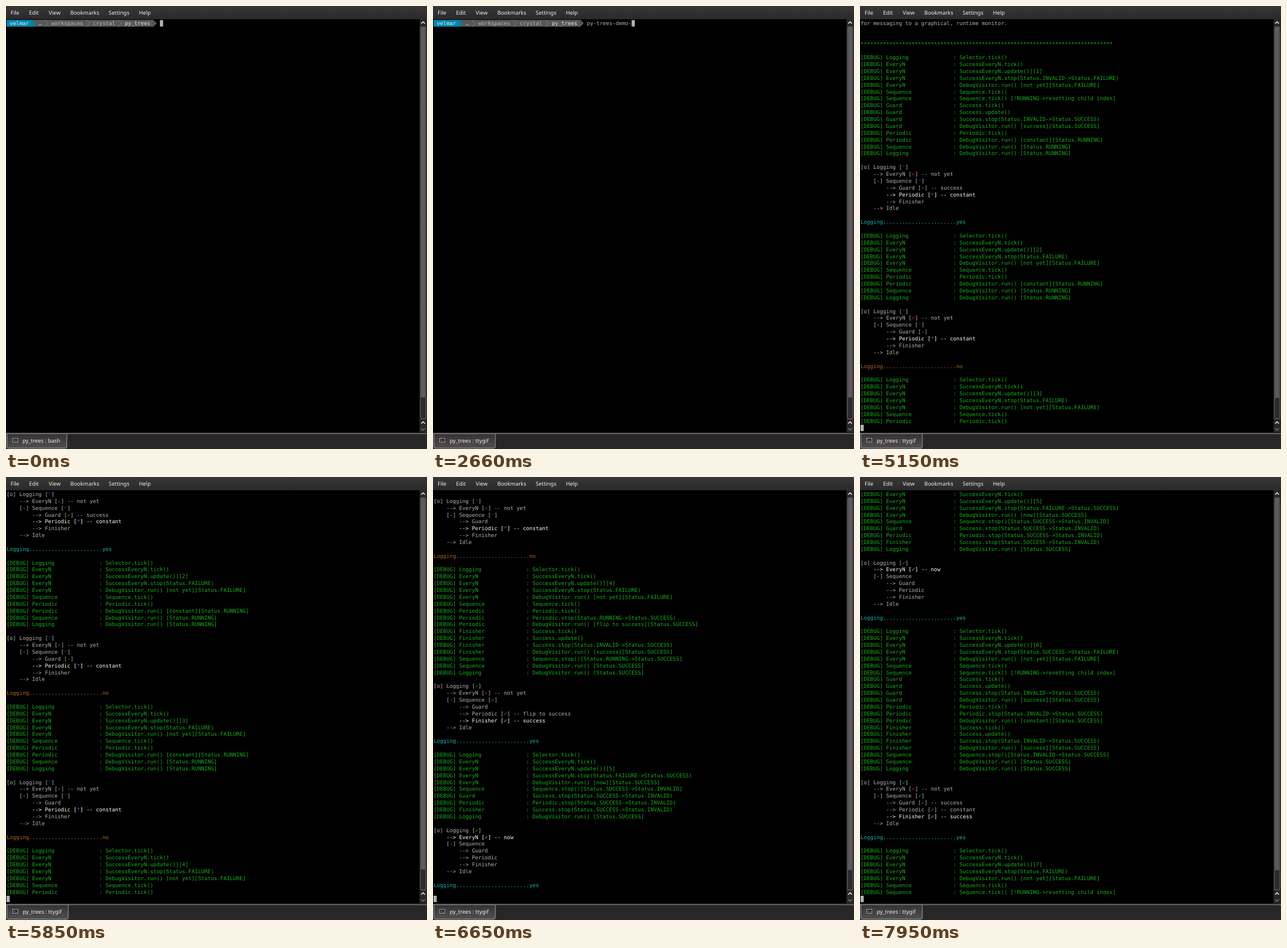
Recreate the animation shown at these times as an HTML page. Size 730 by 767 pixels, loop 8 s.

```html
<!DOCTYPE html>
<html lang="en">
<head>
<meta charset="utf-8">
<title>Terminal session</title>
<style>
html, body { margin: 0; width: 100%; height: 100%; overflow: hidden; background: #000; }
svg { display: block; }
text { white-space: pre; text-rendering: geometricPrecision; }
.mono { font: 9.2px "DejaVu Sans Mono", monospace; fill: #b2b2b2; }
.ui { font: 9.45px "Noto Sans", sans-serif; fill: #f0efee; }
</style>
</head>
<body>
<svg id="stage" width="730" height="767" viewBox="0 0 730 767">
  <defs>
    <linearGradient id="menuFill" x2="0" y2="1">
      <stop stop-color="#393736"/><stop offset="1" stop-color="#2b2929"/>
    </linearGradient>
    <linearGradient id="tabFill" x2="0" y2="1">
      <stop stop-color="#343233"/><stop offset="1" stop-color="#514f50"/>
    </linearGradient>
    <linearGradient id="groove" x2="1" y2="0">
      <stop stop-color="#4a4848"/><stop offset=".3" stop-color="#5d5b5b"/>
      <stop offset=".7" stop-color="#5d5b5b"/><stop offset="1" stop-color="#4a4848"/>
    </linearGradient>
    <clipPath id="screen"><rect y="23.5" width="717" height="714.5"/></clipPath>
  </defs>
  <rect width="730" height="767"/>
  <g clip-path="url(#screen)">
    <g id="rows" class="mono"></g>
    <rect id="cursor" width="5.5" height="11" fill="#b2b2b2"/>
  </g>
  <rect width="730" height="23" fill="url(#menuFill)"/>
  <g id="menu" class="ui"></g>

  <rect x="717" y="23" width="13" height="715" fill="#2a2828"/>
  <rect x="718" y="35.5" width="10.5" height="680" rx="3" fill="url(#groove)"/>
  <rect id="thumb" x="718.5" width="9.5" rx="2.5" fill="#2d2b2b" stroke="#6c6464" stroke-width=".8"/>
  <g fill="none" stroke="#f4f4f4" stroke-width="1.5">
    <path d="M720 30.5l3.2-3.2 3.2 3.2M720 723l3.2-3.2 3.2 3.2"/>
    <path d="M720 731.3l3.2 3.2 3.2-3.2" stroke="#8c8a8a" stroke-width="1.2"/>
  </g>

  <rect y="738" width="730" height="29" fill="#282627"/>
  <path d="M0 740.5H730" stroke="#8e8c8c"/>
  <path id="tab" fill="url(#tabFill)" stroke="#a09e9e"/>
  <rect x="11.5" y="748.5" width="9" height="7" fill="#2b2a2a" stroke="#aaa8a8" stroke-width=".9"/>
  <path d="M13.5 750.2l1.8 1.8-1.8 1.8M16.2 753.8h2.4" fill="none" stroke="#aaa8a8" stroke-width=".8"/>
  <text id="tabText" class="ui" y="755.6"></text>
</svg>
<script>
const LOOP = 8000, COL = 5.539, ROW = 11.873, LEFT = 1, TOP = 24, LAST = 59;
const GREEN = '#18b218', CYAN = '#18b2b2', BROWN = '#b26818', GREY = '#b2b2b2', WHITE = '#ffffff';
const $ = id => document.getElementById(id);
const colX = c => LEFT + c * COL;

function add(parent, tag, attrs, text) {
  const el = document.createElementNS('http://www.w3.org/2000/svg', tag);
  for (const k in attrs) el.setAttribute(k, attrs[k]);
  if (text !== undefined) el.textContent = text;
  return parent.appendChild(el);
}

[['File', 8], ['Edit', 40], ['View', 74], ['Bookmarks', 111.5], ['Settings', 178], ['Help', 230.5]]
  .forEach(([name, x]) => add($('menu'), 'text', { x, y: 15.3 }, name));

// Each row is a group; a run is [text, colour].
const rows = [];
function newRow() {
  const g = add($('rows'), 'g', { transform: `translate(0 ${rows.length * ROW})` });
  rows.push(g);
  return g;
}
function line(...runs) {
  const g = newRow();
  let col = 0;
  for (const [text, fill] of runs) {
    if (text) add(g, 'text', { x: colX(col), y: TOP + 8.9, fill }, text);
    col += text.length;
  }
}
const blank = () => line();

// Prompt
const prompt = newRow();
function block(from, to, fill) {
  add(prompt, 'rect', { x: colX(from), y: TOP, width: (to - from) * COL, height: 11.8, fill });
}
function arrow(col, fill, stroke) {
  const x = colX(col);
  add(prompt, 'path', { d: `M${x} ${TOP}l${COL} 5.9 ${-COL} 5.9`, fill, stroke, 'stroke-width': .8 });
}
block(0, 8, '#0087af');
block(8, 46, '#585858');
arrow(8, '#0087af', 'none');
[12, 25, 35].forEach(c => arrow(c, 'none', '#8c8c8c'));
arrow(46, '#585858', 'none');
[['velmar', 1, '#f4f4f4'], ['…', 10, '#c4c4c4'], ['workspaces', 14, '#bcbcbc'],
 ['crystal', 27, '#bcbcbc'], ['py_trees', 37, '#e4e4e4']]
  .forEach(([s, c, fill]) => add(prompt, 'text', { x: colX(c), y: TOP + 8.9, fill }, s));
const typed = add(prompt, 'text', { x: colX(48), y: TOP + 8.9 });

// Introduction
const stars = () => line(['*'.repeat(79), GREEN]);
blank();
stars();
line([' '.repeat(36), GREY], ['Logging', WHITE]);
stars();
`
A demonstration of logging with trees.

This demo utilises a WindsOfChange visitor to trigger
a post-tick handler to dump a serialisation of the
tree to a json log file.

This coupling of visitor and post-tick handler can be
used for any kind of event handling - the visitor is the
trigger and the post-tick handler the action. Aside from
logging, the most common use case is to serialise the tree
for messaging to a graphical, runtime monitor.

`.split('\n').forEach(s => line([s, GREY]));
stars();
blank();

// Debug entries: node letter, action letter, then optional statuses and note.
const NODES = {
  L: ['Logging', 'Selector'], E: ['EveryN', 'SuccessEveryN'], S: ['Sequence', 'Sequence'],
  G: ['Guard', 'Success'], P: ['Periodic', 'Periodic'], F: ['Finisher', 'Success']
};
const STATUS = { I: 'INVALID', F: 'FAILURE', S: 'SUCCESS', R: 'RUNNING' };

function debug(entry, n) {
  const [head, codes = '', note] = entry.split(':');
  const [name, type] = NODES[head[0]];
  const states = [...codes].map(c => 'Status.' + STATUS[c]).join('->');
  const text = {
    t: () => type + '.tick()',
    r: () => type + '.tick() [!RUNNING->resetting child index]',
    u: () => type + '.update()' + (head[0] === 'E' ? `][${n}]` : ''),
    s: () => type + (head[0] === 'S' ? `.stop()[${states}]` : `.stop(${states})`),
    d: () => 'DebugVisitor.run() ' + (note ? `[${note}]` : '') + `[${states}]`
  }[head[1]]();
  line([`[DEBUG] ${name}`.padEnd(29) + ': ' + text, GREEN]);
}

// Tree nodes: optional "!" for highlight, a mark, then a note.
const MARKS = {
  '*': ['*', '#1818b2', '#5454ff'], x: ['✕', '#b21818', '#ff5454'],
  v: ['✓', GREEN, '#54ff54'], '-': ['-', BROWN, '#ffff54']
};
const LABELS = ['[o] Logging', '    --> EveryN', '    [-] Sequence', '        --> Guard',
  '        --> Periodic', '        --> Finisher', '    --> Idle'];

function tree(nodes) {
  LABELS.forEach((label, i) => {
    let node = nodes[i] || '';
    const bold = node[0] === '!';
    if (bold) node = node.slice(1);
    const fill = bold ? WHITE : GREY;
    if (!node) return line([label, fill]);
    const [glyph, dim, bright] = MARKS[node[0]], note = node.slice(1);
    line([label + ' [', fill], [glyph, bold ? bright : dim], [']' + (note ? ' -- ' + note : ''), fill]);
  });
}

const START = 'Lt|Et|Eu|';
const FAIL = 'Es:F|Ed:F:not yet|';
const WAIT = START + FAIL + 'St|Pt|Pd:R:constant|Sd:R|Ld:R';
const GUARD = 'St|Sr|Gt|Gu|Gs:IS|Gd:S:success|';
const FINISH = 'Ft|Fu|Fs:IS|Fd:S:success|';
const TICKS = [
  { at: 3850, steps: 3, log: START + 'Es:IF|Ed:F:not yet|' + GUARD + 'Pt|Pd:R:constant|Sd:R|Ld:R',
    nodes: ['*', 'xnot yet', '*', 'vsuccess', '!*constant'], saved: true },
  { at: 4550, steps: 2, log: WAIT, nodes: ['*', 'xnot yet', '*', '-', '!*constant'] },
  { at: 5150, steps: 3, log: WAIT, nodes: ['*', 'xnot yet', '*', '', '!*constant'] },
  { at: 5850, steps: 3,
    log: START + FAIL + 'St|Pt|Ps:RS|Pd:S:flip to success|' + FINISH + 'Ss:RS|Sd:S|Ld:S',
    nodes: ['v', 'xnot yet', 'v', '', 'vflip to success', '!vsuccess'], saved: true },
  { at: 6550, steps: 2, log: START + 'Es:FS|Ed:S:now|Ss:SI|Gs:SI|Ps:SI|Fs:SI|Ld:S',
    nodes: ['v', '!vnow'], saved: true },
  { at: 7150, steps: 4,
    log: START + 'Es:SF|Ed:F:not yet|' + GUARD + 'Pt|Ps:IS|Pd:S:constant|' + FINISH + 'Ss:IS|Sd:S|Ld:S',
    nodes: ['v', 'xnot yet', 'v', 'vsuccess', 'vconstant', '!vsuccess'], saved: true },
  { at: 7950, steps: 2, log: START + FAIL + 'St|Sr', nodes: ['*'] }
];

// Output arrives in bursts of seven log lines, 100 ms apart: [time, cursor row].
const bursts = [[0, 0], [3560, 1], [3750, rows.length]];
TICKS.forEach((tick, i) => {
  const first = rows.length, log = tick.log.split('|');
  log.forEach(e => debug(e, i + 1));
  blank();
  tree(tick.nodes);
  blank();
  line(['Logging' + '.'.repeat(23) + (tick.saved ? 'yes' : 'no'), tick.saved ? CYAN : BROWN]);
  blank();
  for (let k = 1; k <= tick.steps; k++) {
    const end = k < tick.steps ? first + Math.min(7 * k, log.length) : rows.length;
    bursts.push([tick.at + 100 * (k - 1), end]);
  }
});

const COMMAND = 'py-trees-demo-logging';
const KEYS = [860, 950, 1170, 1250, 1430, 1460, 1630, 1830, 2010, 2130, 2280, 2340, 2410,
  2660, 2850, 3040, 3140, 3280, 3350, 3420, 3490];

function setTab(running) {
  const right = running ? 108 : 105.5;
  $('tab').setAttribute('d', `M1.5 740.5H${right}V763q0 2.5 -2.5 2.5H4q-2.5 0 -2.5 -2.5Z`);
  $('tabText').setAttribute('x', running ? 29 : 28.4);
  $('tabText').textContent = 'py_trees : ' + (running ? 'ttygif' : 'bash');
}

function draw(t) {
  const keys = KEYS.filter(k => t >= k).length;
  const end = bursts.filter(b => t >= b[0]).pop()[1];
  const top = Math.max(0, end - LAST);
  typed.textContent = COMMAND.slice(0, keys);
  rows.forEach((g, i) => {
    const shown = i >= top && (i < end || i === 0);
    g.setAttribute('display', shown ? 'inline' : 'none');
  });
  $('rows').setAttribute('transform', `translate(0 ${-top * ROW})`);
  $('cursor').setAttribute('x', colX(end ? 0 : 48 + keys));
  $('cursor').setAttribute('y', TOP + .5 + (end - top) * ROW);
  const thumbY = 677 + [5150, 5850, 6050].filter(s => t >= s).length;
  $('thumb').setAttribute('y', thumbY);
  $('thumb').setAttribute('height', 714.5 - thumbY);
  setTab(t >= 1830);
}

function frame() {
  draw(performance.now() % LOOP);
  requestAnimationFrame(frame);
}
frame();
</script>
</body>
</html>
```
